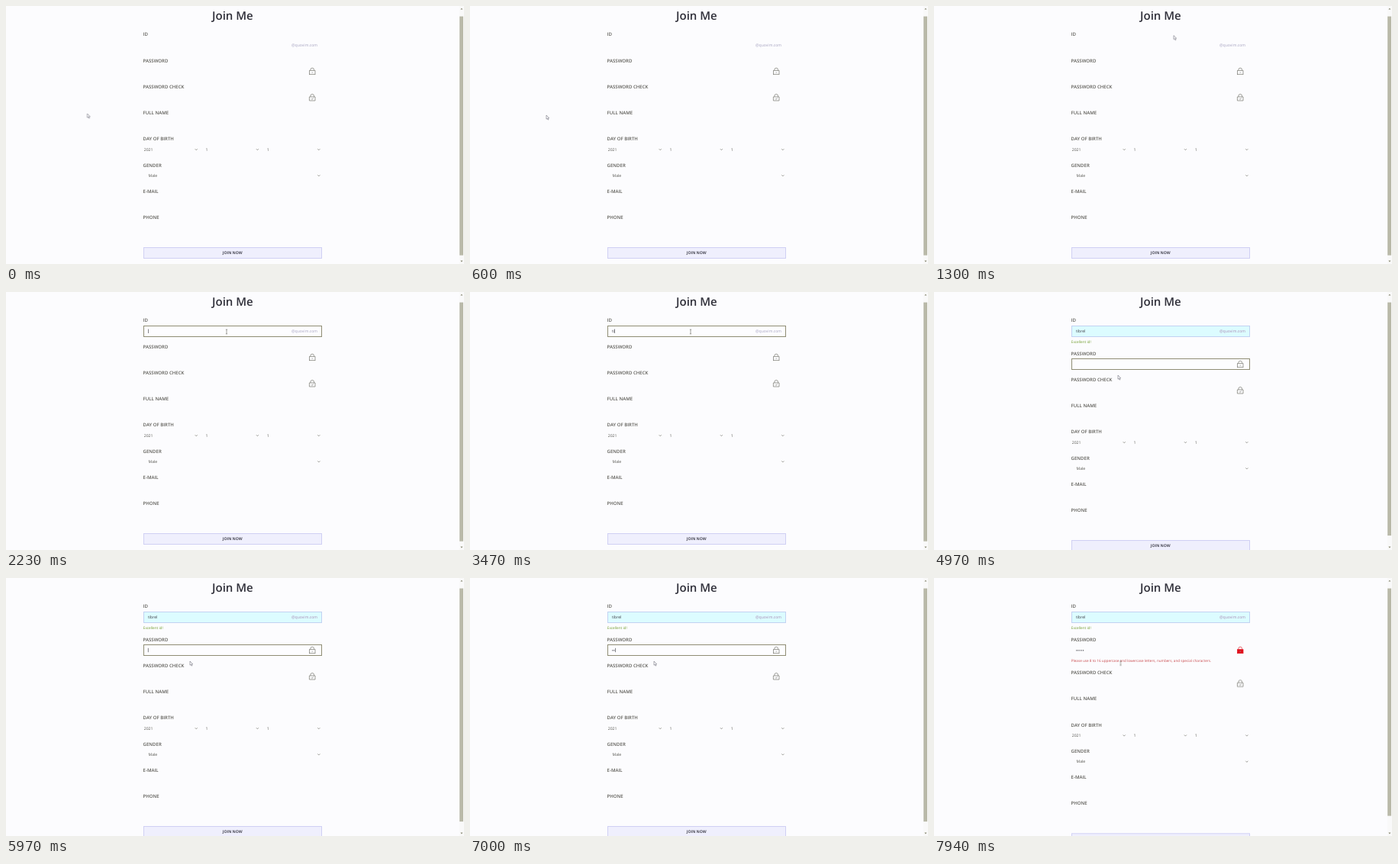
An HTML page for the animation above (8000 ms loop, 600 by 338 pixels).

```html
<!DOCTYPE html>
<html lang="en">
<head>
<meta charset="utf-8">
<title>Join Me</title>
<style>
  html, body { margin: 0; width: 100%; height: 100%; overflow: hidden; background: #fcfcfe; }
  svg { display: block; width: 100vw; height: 100vh; }
  text { font: 5.1px "Open Sans", "Noto Sans", sans-serif; fill: #55554f; text-rendering: geometricPrecision; white-space: pre; }
  .title { font-size: 15px; font-weight: 600; fill: #30303a; text-anchor: middle; }
  .label { font-size: 6.05px; font-weight: 600; fill: #5c5b55; }
  .button { font-weight: 700; text-anchor: middle; fill: #4c4c58; }
  .suffix { text-anchor: end; fill: #a6a3c0; }
  .typed { fill: #3c3c44; }
  #secret { font-size: 5.8px; }
  .ok { font-size: 4.7px; fill: #6f9c2c; }
  .error { font-size: 4.65px; fill: #c8484c; }
  .line { fill: none; stroke: #77776f; stroke-width: .7; }
  .caret { fill: #33333a; }

  /* One 8 s clock; form states switch without easing. */
  .field, .suffix, .ok, .error, .below-id, .below-password, .thumb, .arrow, .beam, .lock-body, .lock-line {
    animation: 8s step-end infinite;
  }
  #id-field { animation-name: id-field; }
  #password-field { animation-name: password-field; }
  .suffix { animation-name: suffix; }
  .ok { animation-name: ok; }
  .error { animation-name: error; }
  .below-id { animation-name: below-id; }
  .below-password { animation-name: below-password; }
  .thumb { animation-name: thumb; }
  .arrow { animation-name: arrow; }
  .beam { animation-name: beam; }
  .lock-body { animation-name: lock-body; }
  .lock-line { animation-name: lock-line; }
  #cursor { animation: cursor 8s ease-in-out infinite; }

  @keyframes id-field {
    0% { fill: #fcfcfe; stroke: #fcfcfe; }
    22.5% { fill: #fdfdff; stroke: #8f8d74; }
    48.75% { fill: #dcfcff; stroke: #66706c; }
    55.2%, 100% { fill: #dcfcff; stroke: #c2d2f2; }
  }
  @keyframes password-field {
    0% { fill: #fcfcfe; stroke: #fcfcfe; }
    55.2% { fill: #fdfdff; stroke: #8f8d74; }
    96.25%, 100% { fill: #fcfcfe; stroke: #fcfcfe; }
  }
  @keyframes suffix { 0% { fill: #a6a3c0; } 48.75%, 100% { fill: #a98bb4; } }
  @keyframes ok { 0% { opacity: 0; } 55.2%, 100% { opacity: 1; } }
  @keyframes error { 0% { opacity: 0; } 96.25%, 100% { opacity: 1; } }
  @keyframes below-id { 0% { transform: none; } 55.2%, 100% { transform: translateY(9px); } }
  @keyframes below-password { 0% { transform: none; } 96.25%, 100% { transform: translateY(9.3px); } }
  @keyframes thumb { 0% { height: 313px; } 55.2% { height: 305.5px; } 96.25%, 100% { height: 298px; } }
  @keyframes arrow {
    0%, 53.5%, 58% { opacity: 1; }
    19.5%, 54.3%, 96.25%, 100% { opacity: 0; }
  }
  @keyframes beam {
    0%, 53.5%, 58% { opacity: 0; }
    19.5%, 54.3%, 96.25%, 100% { opacity: 1; }
  }
  @keyframes lock-body { 0% { fill: #fcfcfe; stroke: #77776f; } 96.25%, 100% { fill: #e0101c; stroke: #e0101c; } }
  @keyframes lock-line { 0% { stroke: #77776f; } 96.25%, 100% { stroke: #d83038; } }
  @keyframes cursor {
    0% { transform: translate(108.5px, 144px); }
    5%, 10.75% { transform: translate(102px, 146px); }
    16.25% { transform: translate(316px, 41.5px); }
    22%, 52% { transform: translate(289px, 52px); }
    55%, 56.5% { transform: translate(241px, 89.5px); }
    61%, 95% { transform: translate(243px, 112px); }
    98%, 100% { transform: translate(244.5px, 111.5px); }
  }
</style>
</head>
<body>
<svg viewBox="0 0 600 338" preserveAspectRatio="none">
  <defs>
    <path id="chevron" class="line" d="M-1.5-.8 0 .8 1.5-.8"/>
  </defs>

  <rect width="600" height="338" fill="#fcfcfe"/>
  <text class="title" x="296.9" y="18">Join Me</text>

  <text class="label" x="179.6" y="39.2">ID</text>
  <rect id="id-field" class="field" x="180.5" y="44.5" width="233" height="14"/>
  <text id="user" class="typed" x="186" y="53"></text>
  <rect id="user-caret" class="caret" y="48.6" width=".6" height="5.4"/>
  <text class="suffix" x="408" y="53.2">@quovim.com</text>
  <text class="ok" x="179.8" y="66.6">Excellent id!</text>

  <g class="below-id">
    <text class="label" x="179.6" y="73.6">PASSWORD</text>
    <rect id="password-field" class="field" x="180.5" y="78.5" width="233" height="14"/>
    <text id="secret" class="typed" x="185.7" y="87.6"></text>
    <rect id="secret-caret" class="caret" y="82.8" width=".6" height="5.4"/>
    <g transform="translate(401.2 84.7)">
      <path class="line lock-line" d="M-2.3 0v-1.2a2.3 2.3 0 0 1 4.6 0V0"/>
      <rect class="line lock-body" x="-3.8" width="7.6" height="5"/>
      <circle cy="2.5" r=".6" fill="#999"/>
    </g>
    <text class="error" x="179.8" y="101.1">Please use 8 to 16 uppercase and lowercase letters, numbers, and special characters.</text>

    <g class="below-password">
      <g id="labels"></g>
      <path class="line" transform="translate(401.2 119)"
        d="M-2.3 0v-1.2a2.3 2.3 0 0 1 4.6 0V0M-3.8 0h7.6v5h-7.6zM-1.4 2.4l1 1 1.9-1.8"/>
      <text x="180.8" y="190">2021</text>
      <text x="261.5" y="190">1</text>
      <text x="341.7" y="190">1</text>
      <text x="186.6" y="224.2">Male</text>
      <use href="#chevron" x="249.2" y="188"/>
      <use href="#chevron" x="329.4" y="188"/>
      <use href="#chevron" x="409.8" y="188"/>
      <use href="#chevron" x="409.8" y="222.2"/>
      <rect x="180.5" y="316.5" width="233" height="14" fill="#efeffd" stroke="#d0d0f4"/>
      <text class="button" x="296.7" y="325.1">JOIN NOW</text>
    </g>
  </g>

  <rect x="594" width="6" height="338" fill="#f9f9f9"/>
  <rect class="thumb" x="594.2" y="13.6" width="4.8" height="313" fill="#b9b9a8"/>
  <path d="M595.4 4.6 596.9 2.8 598.4 4.6zM595.4 333.6 596.9 335.4 598.4 333.6z" fill="#85856f"/>

  <g id="cursor">
    <path class="arrow" d="M-2-3v5.2l1.2-1 .9 1.9.9-.4-.9-1.8h1.6z" fill="#fff" stroke="#70707c" stroke-width=".6"/>
    <path class="beam line" d="M-1.1-2.8h2.2M0-2.8v5.6M-1.1 2.8h2.2"/>
  </g>
</svg>
<script>
  const LOOP = 8000, BLINK = 530;
  const byId = id => document.getElementById(id);

  ["PASSWORD CHECK", "FULL NAME", "DAY OF BIRTH", "GENDER", "E-MAIL", "PHONE"].forEach((name, i) => {
    const label = document.createElementNS("http://www.w3.org/2000/svg", "text");
    label.setAttribute("class", "label");
    label.setAttribute("x", 179.6);
    label.setAttribute("y", 107.9 + i * 34.26);
    label.textContent = name;
    byId("labels").append(label);
  });

  const inputs = [
    { id: "user", value: "tibrel", focus: 1800, blur: 4416, keys: [3340, 3430, 3580, 3740, 3900, 4050] },
    { id: "secret", value: "•••••", focus: 4416, blur: 7700, keys: [6800, 6950, 7120, 7280, 7440] },
  ];

  function drawInput({ id, value, focus, blur, keys }, t) {
    const text = byId(id), caret = byId(id + "-caret");
    const pressed = keys.filter(key => t >= key);
    const shown = value.slice(0, pressed.length);
    if (text.textContent !== shown) text.textContent = shown;
    const width = shown ? text.getComputedTextLength() : 0;
    const sinceKey = t - (pressed.at(-1) ?? focus);
    const visible = t >= focus && t < blur && Math.floor(sinceKey / BLINK) % 2 === 0;
    caret.setAttribute("x", +text.getAttribute("x") + width + .2);
    caret.setAttribute("opacity", visible ? 1 : 0);
  }

  // Typing follows the cursor animation's clock so both stay in step.
  const clock = byId("cursor").getAnimations()[0];
  function frame() {
    const t = (clock.currentTime ?? 0) % LOOP;
    inputs.forEach(input => drawInput(input, t));
    requestAnimationFrame(frame);
  }
  frame();
</script>
</body>
</html>
```
